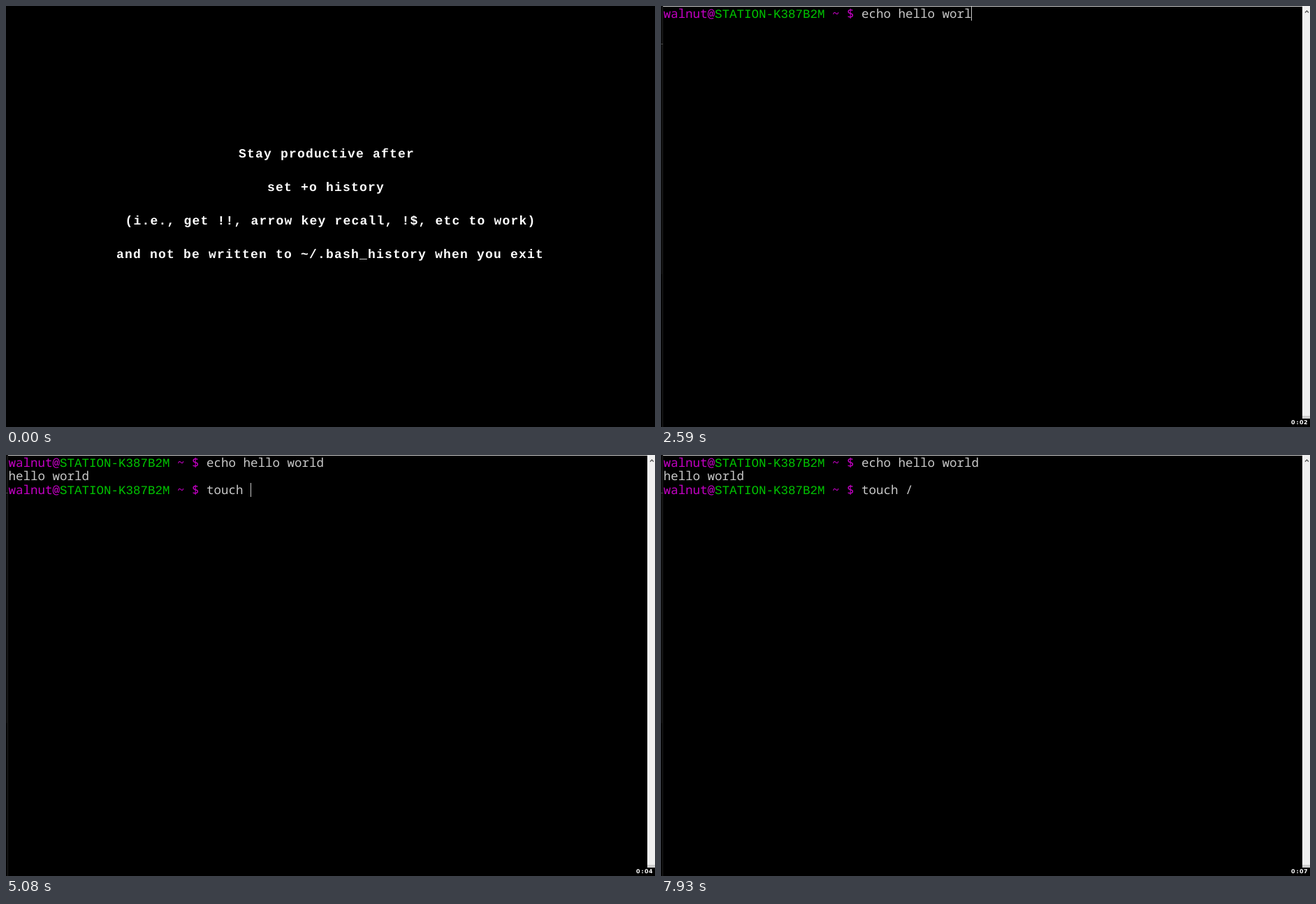
An HTML page that plays this animation: 929x603 px, repeating every 8 s.

```html
<!DOCTYPE html>
<html lang="en">
<head>
<meta charset="utf-8">
<title>Shell history demo</title>
<style>
  html, body { margin: 0; width: 100%; height: 100%; overflow: hidden; background: #000; }
  svg { display: block; width: 929px; height: 603px; }
  text { white-space: pre; text-rendering: geometricPrecision; }
  #title { font: bold 18px "Liberation Mono", monospace; letter-spacing: 1.2px; fill: #fff; }
  #term { font: 500 17.5px "Noto Sans Mono", monospace; fill: #c8c8c8; }
  #clock { font: bold 8px "DejaVu Sans", sans-serif; fill: #fff; }
  .user { fill: #c400c4; }
  .host { font-family: "Liberation Mono", monospace; fill: #00c400; }
</style>
</head>
<body>
<svg viewBox="0 0 929 603">
  <rect width="929" height="603"/>
  <g id="title">
    <text x="333" y="217">Stay productive after</text>
    <text x="374" y="265">set +o history</text>
    <text x="170.5" y="313">(i.e., get !!, arrow key recall, !$, etc to work)</text>
    <text x="158" y="361">and not be written to ~/.bash_history when you exit</text>
  </g>
  <g id="term">
    <g shape-rendering="crispEdges">
      <rect width="2" height="384" fill="#0a0a0a"/>
      <rect x="2" width="1" height="603" fill="#1e1e1e"/>
      <rect y="54" width="3" height="1" fill="#444"/>
      <rect x="3" width="915" height="1" fill="#c8c8c8"/>
      <rect x="918" width="11" height="591" fill="#f0f0f0"/>
      <rect x="918" y="587" width="11" height="4" fill="#cdcdcd"/>
    </g>
    <path d="M922 9.5l2.5-2.5 2.5 2.5" fill="none" stroke="#505050" stroke-width="1.3"/>
    <g id="prompt">
      <text x="3.5" y="17" class="user">walnut@<tspan class="host">STATION-K387B2M</tspan> ~ $</text>
    </g>
    <text id="cmd0" x="287" y="17"></text>
    <g id="reply">
      <text x="3.5" y="36">hello world</text>
      <use href="#prompt" y="39"/>
      <text id="cmd1" x="287" y="56"></text>
    </g>
    <rect id="cursor" width="1" height="20" shape-rendering="crispEdges"/>
    <text id="clock" x="902 909.5 914 920" y="599"></text>
  </g>
</svg>
<script>
const LOOP = 8000, START = 500, ENTER = 3430;
const FIRST = "echo hello world";

// [time, typed text]; a trailing "|" means the cursor is lit
const steps = [
  [500, "echo|"], [630, "echo |"], [780, "echo h|"], [930, "echo he|"],
  [1080, "echo hel|"], [1220, "echo hell|"], [1370, "echo hell"],
  [1800, "echo hell|"], [1930, "echo hello|"], [2060, "echo hello |"],
  [2190, "echo hello w|"], [2320, "echo hello wo|"], [2460, "echo hello wor|"],
  [2590, "echo hello worl|"], [3000, "echo hello worl"], [3280, FIRST + "|"],
  [ENTER, "|"], [3530, ""], [4090, "|"],
  [4520, "t|"], [4660, "to|"], [4800, "tou|"], [4940, "touch|"], [5080, "touch |"],
  [5360, "touch "], [5500, "touch /|"], [5640, "touch /t|"], [5770, "touch /tm|"],
  [6200, "touch /tm"], [6350, "touch /tmp|"], [6490, "touch /tm|"],
  [6620, "touch /t|"], [6760, "touch /|"], [6900, "touch |"],
  [7350, "touch /|"], [7780, "touch /|"], [7930, "touch /"]
];

const el = id => document.getElementById(id);
const show = (id, on) => el(id).setAttribute("visibility", on ? "visible" : "hidden");
let last;

function draw(step) {
  show("title", !step);
  el("term").style.display = step ? "" : "none";
  if (!step) return;

  const [time, entry] = step;
  const typed = entry.replace("|", "");
  const second = time >= ENTER;
  el("cmd0").textContent = second ? FIRST : typed;
  el("cmd1").textContent = second ? typed : "";
  show("reply", second);
  show("cursor", entry.endsWith("|"));
  el("cursor").setAttribute("x", Math.floor(287 + typed.length * 10.5));
  el("cursor").setAttribute("y", second ? 40 : 1);
  el("clock").textContent = "0:0" + Math.floor((time - START) / 1000);
}

function tick() {
  const t = performance.now() % LOOP;
  const step = steps.findLast(([time]) => time <= t) || null;
  if (step !== last) draw(last = step);
  requestAnimationFrame(tick);
}
tick();
</script>
</body>
</html>
```
